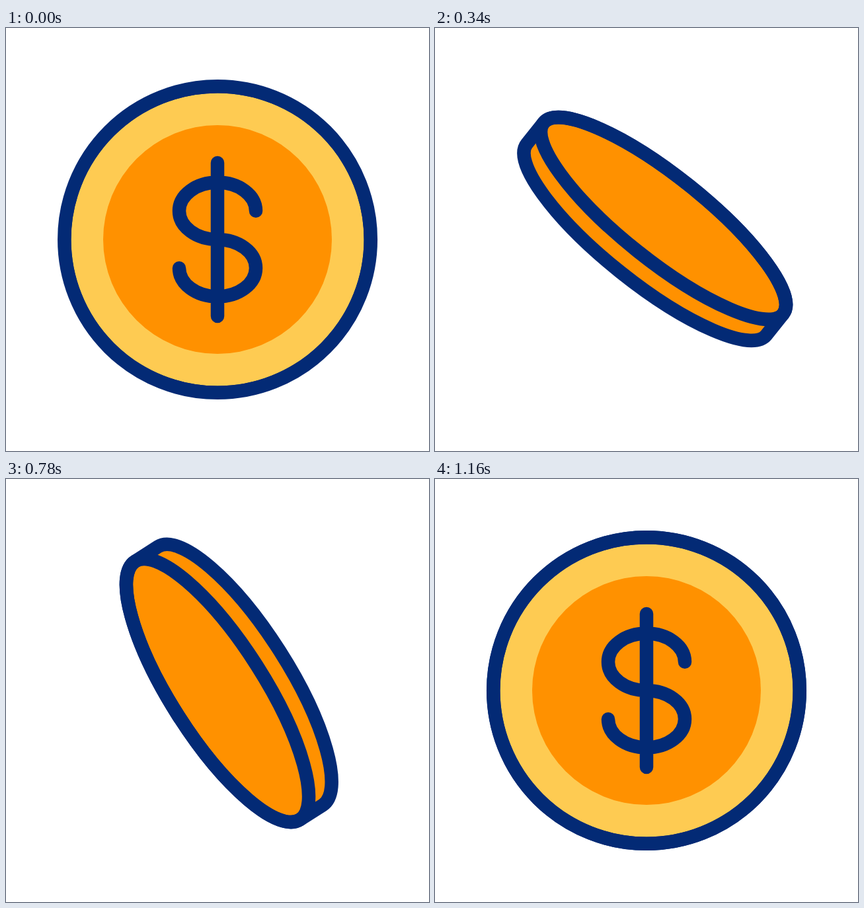
An HTML page that plays this animation: 640x640 px, repeating every 1400 ms.

```html
<!DOCTYPE html>
<html lang="en">
<head>
<meta charset="utf-8">
<title>Spinning coin</title>
<style>
  html, body { margin: 0; width: 100%; height: 100%; overflow: hidden; background: #fff; }
  svg { display: block; width: 100%; height: 100%; }
  .line { fill: none; stroke: #032a75; stroke-linejoin: round; stroke-linecap: round; }
</style>
</head>
<body>
<svg viewBox="0 0 640 640">
  <g id="coin">
    <path id="body" fill="#ff9100"/>
    <ellipse id="face"/>
    <ellipse id="disc" fill="#ff9100"/>
    <path id="sign" class="line"/>
    <ellipse id="rim" class="line"/>
    <path id="edge" class="line"/>
  </g>
</svg>
<script>
const LOOP = 1400, SPIN_END = 1140, TURN = 560;
const R = 231.8, DISC = 173, LINE = 20.5;

// [time, value] points
const SPIN = [[0, 0], [160, 54], [340, 105.5], [560, 181], [620, 202], [780, 252], [920, 293.2], [SPIN_END, 360]];
const DEPTH = [[0, 0], [160, 19], [340, 41], [500, 7], [560, 0], [620, 6.4], [780, 41], [920, 30], [SPIN_END, 0]];
const SHIFT = [[0, 0], [780, 0], [920, -4.5], [SPIN_END, 0]];

const el = id => document.getElementById(id);
const [coin, body, face, disc, sign, rim, edge] =
  ['coin', 'body', 'face', 'disc', 'sign', 'rim', 'edge'].map(el);

function set(node, attrs) {
  for (const k in attrs) node.setAttribute(k, attrs[k]);
}

const clamp = (v, lo, hi) => Math.min(hi, Math.max(lo, v));
const ease = u => (1 - Math.cos(Math.PI * clamp(u, 0, 1))) / 2;

// Smooth curve through the points of a track
function track(pts, time) {
  const last = pts.length - 1;
  const t = clamp(time, pts[0][0], pts[last][0]);
  let i = 0;
  while (i < last - 1 && t > pts[i + 1][0]) i++;
  const slope = k => {
    const a = pts[Math.max(k - 1, 0)], b = pts[Math.min(k + 1, last)];
    return (b[1] - a[1]) / (b[0] - a[0]);
  };
  const [t0, v0] = pts[i], [t1, v1] = pts[i + 1];
  const span = t1 - t0, u = (t - t0) / span, u2 = u * u, u3 = u2 * u;
  return v0 * (2 * u3 - 3 * u2 + 1) + v1 * (3 * u2 - 2 * u3)
    + span * (slope(i) * (u3 - 2 * u2 + u) + slope(i + 1) * (u3 - u2));
}

function draw(t) {
  const turn = Math.cos(track(SPIN, t) * Math.PI / 180);
  const tilt = 63 * (t < 475 ? ease(t / 475) : 1 - ease((t - 475) / 625));
  const depth = Math.max(0, track(DEPTH, t));
  const shift = t > 780 ? track(SHIFT, t) : 0;
  const front = turn > 0;
  const squash = Math.max(Math.abs(turn), 0.002);
  const rx = R * squash;
  // the visible face sits on the left or the right end of the body
  const cx = front === (t < TURN) ? 0 : depth;

  set(coin, { transform: `translate(320 320) rotate(${-tilt}) translate(${shift} 0)` });

  const hull = `M0 ${-R}H${depth}A${rx} ${R} 0 0 1 ${depth} ${R}H0A${rx} ${R} 0 0 1 0 ${-R}Z`;
  set(body, { d: hull });
  set(edge, { d: hull, 'stroke-width': LINE });

  // the inner line is thinner at the start of the spin
  const inset = t < TURN && front ? 10 * clamp((285 - t) / 125, 0, 1) : 0;
  const oval = { cx, rx: Math.max(rx - inset / 2, 0.1), ry: R - inset / 2 };
  set(face, { ...oval, fill: front ? '#fecb52' : '#ff9100' });
  set(rim, { ...oval, 'stroke-width': LINE - inset });

  const show = front ? 'inline' : 'none';
  set(disc, { cx, rx: DISC * squash, ry: DISC, display: show });
  const w = 58 * squash, h = 43.2;
  set(sign, {
    d: `M${cx} -116V116M${cx + w} ${-h}A${w} ${h} 0 1 0 ${cx} 0A${w} ${h} 0 1 1 ${cx - w} ${h}`,
    'stroke-width': LINE,
    display: show
  });
}

const start = performance.now();
function tick() {
  draw((performance.now() - start) % LOOP);
  requestAnimationFrame(tick);
}
draw(0);
requestAnimationFrame(tick);
</script>
</body>
</html>
```
